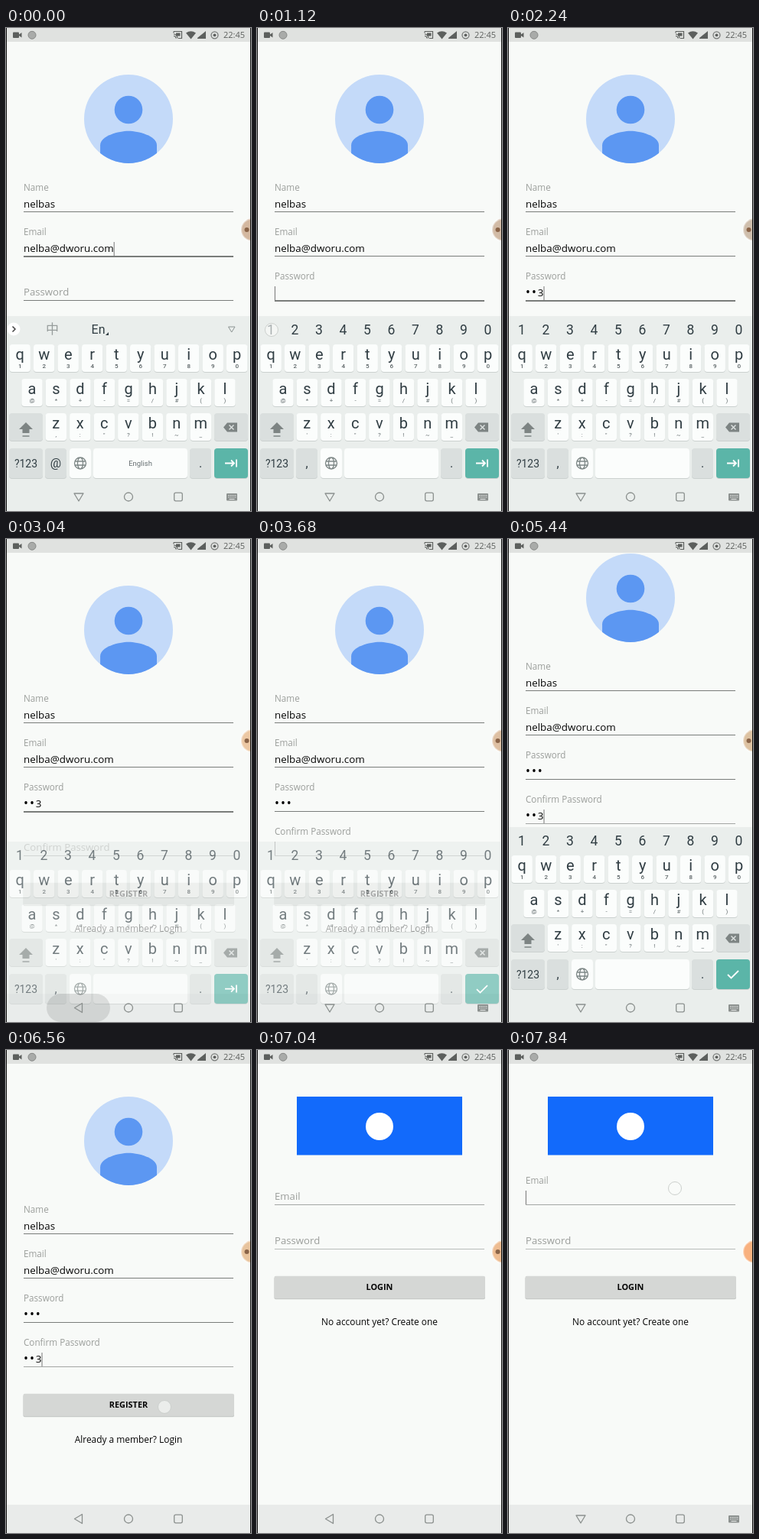
Write an HTML page that moves like this. It is 320x632 px and loops after 8 s.

```html
<!DOCTYPE html>
<html lang="en">
<head>
<meta charset="utf-8">
<title>Sign-up form</title>
<style>
  html, body { margin: 0; width: 100%; height: 100%; overflow: hidden; background: #f8faf8; }
  svg { display: block; width: 100%; height: 100%; }
  text { font-family: "Open Sans", "Noto Sans", sans-serif; fill: #050505; white-space: pre; }
  .hint { fill: #9b9e9b; }
  .key { font-family: Roboto, sans-serif; fill: #303d43; }
  .small { font-family: Roboto, sans-serif; fill: #666f71; }
  .digit { font-family: Roboto, sans-serif; fill: #5a6365; font-weight: 500; }
  .line { fill: none; stroke: #8b908e; stroke-width: 1.3; }
</style>
</head>
<body>
<svg id="stage" viewBox="0 0 320 632">
  <defs><clipPath id="disc"><circle cx="160" cy="119" r="58"/></clipPath></defs>
  <rect width="320" height="632" fill="#f8faf8"/>

  <g id="signup">
    <circle cx="160" cy="119" r="58" fill="#c4daf9"/>
    <g fill="#5c97f2" clip-path="url(#disc)">
      <circle cx="160" cy="107" r="18.300"/>
      <path transform="translate(104.600 70) scale(4.620)" d="M12 14C9.330 14 4 15.340 4 18V26H20V18C20 15.340 14.670 14 12 14Z"/>
    </g>
  </g>
  <g id="login">
    <rect y="18" width="320" height="580" fill="#f8faf8"/>
    <rect x="52" y="61" width="216" height="76.500" fill="#126afb"/>
    <circle cx="160" cy="100" r="18" fill="#fff"/>
  </g>
  <rect id="scrollbar" x="316" y="49" width="3" height="260" fill="#a5a8a6"/>

  <rect y="595" width="320" height="37" fill="#e9ebea"/>
  <g id="keyboard"><rect y="377" width="320" height="255" fill="#eaeeec"/></g>

  <rect id="backRipple" x="53" y="595" width="83" height="37" rx="18.500" fill="#000" opacity=".1"/>
  <g class="line" stroke-linejoin="round">
    <path id="back" d="M89 609H101L95 619Z"/>
    <circle cx="160" cy="613.500" r="5.500"/>
    <rect x="219.700" y="608.200" width="10.600" height="10.600" rx="2"/>
  </g>
  <g id="imeIcon">
    <rect x="288" y="609" width="14" height="9.500" rx="1" fill="#8b908e"/>
    <path d="M290 611.500H300.500M290 613.800H300.500" stroke="#e9ebea" stroke-dasharray="1.400 .9"/>
    <path d="M291.500 616.500H298.500" stroke="#e9ebea"/>
  </g>

  <rect width="320" height="18" fill="#e0e2e0"/>
  <g fill="#5c5f5d">
    <rect x="9" y="5.500" width="8" height="7.500" rx="1"/><path d="M17 8.500L20.500 6V12.500L17 10Z"/>
    <circle cx="34" cy="9.300" r="5" fill="#a9aba9" stroke="#858785"/>
    <path d="M219 4.500H229.500V13.500H225M219 4.500V6.500M219 8A5.500 5.500 0 0 1 224 13.500M219 10.500A3 3 0 0 1 222 13.500" fill="none" stroke="#5c5f5d" stroke-width="1.200"/>
    <rect x="222" y="6.500" width="5.500" height="4"/>
    <path d="M235 6.500Q241.500 2 248 6.500L241.500 14.500Z"/><path d="M250 14V13L261 4V14Z"/>
    <circle cx="272.500" cy="9.300" r="4.500" fill="none" stroke="#777a78" stroke-width="1.300"/><circle cx="272.500" cy="9.300" r="1.900"/>
  </g>
  <text x="284" y="13.300" font-size="11" style="fill:#5c5f5d">22:45</text>

  <circle id="bubble" cx="322" cy="264" r="15" stroke="#fff" stroke-opacity=".45" stroke-width="2.500"/>
  <circle id="bubbleDot" cx="314.500" cy="264" r="3" fill="#8a6448"/>
  <circle id="touch" r="8.500" fill="#fafcfa" fill-opacity=".6" stroke="#ccd0cd"/>
  <path d="M.5 0V632M319.500 0V632" stroke="#111"/>
</svg>

<script>
const LOOP = 8000, STEP = 160, REVEAL = 1500;
const $ = id => document.getElementById(id);
const show = (node, on) => node.setAttribute('display', on ? 'inline' : 'none');

function add(parent, tag, attrs, content) {
  const node = document.createElementNS('http://www.w3.org/2000/svg', tag);
  for (const name in attrs) node.setAttribute(name, attrs[name]);
  if (content) node.textContent = content;
  return parent.appendChild(node);
}
const label = (parent, x, y, size, content, attrs) =>
  add(parent, 'text', { x, y, 'font-size': size, ...attrs }, content);
const centred = (parent, x, y, size, content, cls = '') =>
  label(parent, x, y, size, content, { class: cls, 'text-anchor': 'middle' });

// Piecewise linear value through [time, value] stops.
function track(stops, t) {
  const next = stops.findIndex(s => s[0] > t);
  if (next === 0) return stops[0][1];
  if (next < 0) return stops[stops.length - 1][1];
  const [t0, a] = stops[next - 1], [t1, b] = stops[next];
  return a + (b - a) * (t - t0) / (t1 - t0);
}

/* ---- form ---- */
function field(parent, name, lineY, { value = '', focus = -1e4, blur = Infinity, typed = [], stroke = '#797c7a', focusWeight = 2 }) {
  const line = add(parent, 'rect', { x: 23, y: lineY, width: 274, fill: stroke });
  const hint = label(parent, 23, 0, 12, name, { class: 'hint' });
  const text = label(parent, 23, lineY - 5.5, 13.4, value);
  const dots = add(text, 'tspan', { 'font-size': 16, 'letter-spacing': 1.9 });
  const digit = add(text, 'tspan', {});
  const caret = add(parent, 'rect', { y: lineY - 18, width: 1, height: 18, fill: '#777' });

  return t => {
    const up = value ? 1 : Math.min(1, Math.max(0, (t - focus + 80) / 200));
    hint.setAttribute('y', lineY - 6.5 - 21 * up);
    hint.setAttribute('font-size', 13.2 - 1.5 * up);

    const done = typed.filter(at => at <= t), last = done[done.length - 1];
    const shown = done.length && t - last < REVEAL;
    dots.textContent = '•'.repeat(done.length - (shown ? 1 : 0));
    digit.textContent = shown ? done.length : '';

    const focused = focus <= t && t < blur;
    line.setAttribute('height', focused ? focusWeight : 1);
    const since = t - (last ?? Math.max(focus, 0));
    const on = focused && since % 1000 < 500;
    show(caret, on);
    if (on) caret.setAttribute('x', 23 + (text.textContent ? text.getComputedTextLength() : 0));
  };
}

function button(parent, y, caption) {
  add(parent, 'rect', { x: 22.5, y: y + 1, width: 275.5, height: 29.3, rx: 2, fill: '#c6c9c7' });
  add(parent, 'rect', { x: 22.5, y: y - .3, width: 275.5, height: 29.3, rx: 2, fill: '#d5d7d5' });
  label(parent, 160, y + 18, 10.9, caption, { 'text-anchor': 'middle', 'font-weight': 700 });
}

const signup = $('signup'), login = $('login');
const light = { stroke: '#a3a6a4', focusWeight: 1 };
const fields = [
  field(signup, 'Name', 240, { value: 'nelbas', focus: Infinity }),
  field(signup, 'Email', 298, { value: 'nelba@dworu.com', blur: 640 }),
  field(signup, 'Password', 356, { focus: 640, blur: 3520, typed: [1280, 1680, 2080] }),
  field(signup, 'Confirm Password', 414, { focus: 3520, typed: [4480, 4880, 5280], ...light }),
  field(login, 'Email', 202, { focus: 7680, ...light }),
  field(login, 'Password', 260, { focus: Infinity, stroke: '#b9bcba' }),
];
button(signup, 450, 'REGISTER');
centred(signup, 160, 514, 11.9, 'Already a member? Login');
button(login, 296, 'LOGIN');
centred(login, 160, 359.5, 11.9, 'No account yet? Create one');

/* ---- keyboard ---- */
const keyboard = $('keyboard');
const WHITE = '#fbfdfc', GREY = '#dadfde', TEAL = '#5bb5a8', PITCH = 31.5;

function cap(x, y, width, fill, height = 36) {
  add(keyboard, 'rect', { x, y: y + 1, width, height, rx: 4, fill: '#cbd1cf' });
  add(keyboard, 'rect', { x, y, width, height, rx: 4, fill });
}
function keyRow(letters, hints, x, y, hintClass = 'small') {
  [...letters].forEach((letter, i) => {
    const cx = x + i * PITCH;
    cap(cx - 13.7, y, 27.4, WHITE);
    centred(keyboard, cx, y + 20, 20, letter, 'key');
    centred(keyboard, cx, y + 31, 8, hints[i], hintClass);
  });
}
const icon = (parent, d, stroke, attrs) =>
  add(parent, 'path', { d, stroke, fill: 'none', 'stroke-width': 1.5, ...attrs });

keyRow('qwertyuiop', '1234567890', 18.2, 414, 'digit');
keyRow('asdfghjkl', '@*+-=/#()', 34, 459);
keyRow('zxcvbnm', ' :"?!~_', 65.3, 504);
cap(4, 504, 44, GREY);
cap(272, 504, 44, GREY);
cap(4, 550, 44, GREY, 39);
cap(51, 550, 28, GREY, 39);
cap(83, 550, 28, WHITE, 39);
cap(114, 550, 123, WHITE, 39);
cap(240, 550, 28, GREY, 39);
cap(272, 550, 44, TEAL, 39);

icon(keyboard, 'M26 516L35 525H30.500V530H21.500V525H17Z', 'none', { fill: '#7d8483' });
icon(keyboard, 'M21.500 534H30.500', '#7d8483');
icon(keyboard, 'M284 522.500L289 516.500H302V528.500H289Z', 'none', { fill: '#7d8483' });
icon(keyboard, 'M291.500 519.500L297.500 525.500M297.500 519.500L291.500 525.500', GREY);
icon(keyboard, 'M89.500 569.500a7.500 7.500 0 1 0 15 0a7.500 7.500 0 1 0 -15 0M93.500 569.500a3.500 7.500 0 1 0 7 0a3.500 7.500 0 1 0 -7 0M90 567H104M90 572H104', '#7d8786', { 'stroke-width': 1.3 });
centred(keyboard, 26, 575, 14, '?123', 'key');
centred(keyboard, 254, 575, 16, '.', 'key');

const emailKeys = add(keyboard, 'g', {}), numberKeys = add(keyboard, 'g', {});
add(emailKeys, 'circle', { cx: 10, cy: 394, r: 8.5, fill: '#fff' });
icon(emailKeys, 'M8.500 390.500L12 394L8.500 397.500', '#444');
label(emailKeys, 60.5, 400, 17, '中', { 'text-anchor': 'middle', style: 'font-family:"Noto Sans CJK SC","Noto Sans CJK",sans-serif;fill:#969c9b' });
centred(emailKeys, 120.5, 400, 16, 'En', 'key');
icon(emailKeys, 'M134 398V402H130Z', 'none', { fill: '#303d43' });
icon(emailKeys, 'M290.500 391H299L294.700 398Z', '#8b9392', { 'stroke-width': 1 });
centred(emailKeys, 65, 574.5, 16, '@', 'key');
centred(emailKeys, 175.5, 573, 9.5, 'English', 'small');
centred(emailKeys, 65.3, 535, 8, ',', 'small');
[...'1234567890'].forEach((n, i) => centred(numberKeys, 18 + i * PITCH, 401, 17.5, n, 'key'));
centred(numberKeys, 65, 575, 16, ',', 'key');
centred(numberKeys, 65.3, 535, 8, "'", 'small');

const nextIcon = icon(keyboard, 'M286 569.500H298M294 565.500L298 569.500L294 573.500M301 564.500V574.500', '#fff', { 'stroke-width': 1.8 });
const doneIcon = icon(keyboard, 'M287 570L291.500 574.500L301 565', '#fff', { 'stroke-width': 1.8 });

/* ---- timeline ---- */
const keyboardUp = [[2880, 1], [3040, .66], [3200, 0], [3520, 0], [3680, .66], [3840, 1], [5920, 1], [6080, .66], [6240, 0]];
const scroll = [[3680, 0], [4000, -42], [5920, -42], [6080, 0]];
const bubbleTone = [[0, '#d4b8a0'], [2240, '#cfbeac'], [3040, '#ecc8a4'], [4320, '#cfb8a2'],
                    [5440, '#ddc2a2'], [6560, '#e8c49e'], [7840, '#f8b17f']];
const channel = n => bubbleTone.map(([at, hex]) => [at, parseInt(hex.slice(1 + 2 * n, 3 + 2 * n), 16)]);
const bubbleRgb = [0, 1, 2].map(channel);
// start, end, x, y
const touches = [
  [320, 640, 294, 570],
  [1120, 1440, 19, 395], [1600, 1840, 50, 395], [1920, 2240, 82, 395],
  [2720, 3040, 95, 613], [3360, 3680, 150, 403],
  [4320, 4640, 19, 395], [4800, 4960, 50, 395], [5120, 5440, 82, 395],
  [5760, 6080, 95, 613], [6400, 6880, 207, 467], [7680, 8000, 218, 181],
];

function render(t) {
  fields.forEach(update => update(t));
  signup.setAttribute('transform', `translate(0 ${track(scroll, t)})`);
  $('scrollbar').setAttribute('opacity', track([[3840, 0], [4000, 1], [4480, 1], [4800, 0]], t));

  const enter = track([[6720, 0], [7040, 1]], t);
  show(login, enter > 0);
  login.setAttribute('opacity', enter);
  login.setAttribute('transform', `translate(0 ${40 * (1 - enter)})`);

  const up = track(keyboardUp, t);
  show(keyboard, up > 0);
  keyboard.setAttribute('opacity', up);
  keyboard.setAttribute('transform', `translate(0 ${56 * (1 - up)})`);
  show(emailKeys, t < 800);
  show(numberKeys, t >= 800);
  show(nextIcon, t < 3520);
  show(doneIcon, t >= 3520);

  const imeOpen = t < 2880 || (t >= 3680 && t < 5920) || t >= 7840;
  show($('imeIcon'), imeOpen);
  $('back').setAttribute('transform', imeOpen ? '' : 'rotate(90 95 613.5)');
  show($('backRipple'), (t >= 2880 && t < 3200) || (t >= 5920 && t < 6240));

  $('bubble').setAttribute('fill', `rgb(${bubbleRgb.map(stops => Math.round(track(stops, t)))})`);
  show($('bubbleDot'), t < 7680);

  const tap = touches.find(([start, end]) => start <= t && t < end);
  show($('touch'), tap);
  if (tap) {
    $('touch').setAttribute('cx', tap[2]);
    $('touch').setAttribute('cy', tap[3]);
  }
}

const start = performance.now();
function tick() {
  const t = (performance.now() - start) % LOOP;
  render(Math.floor(t / STEP) * STEP);
  requestAnimationFrame(tick);
}
tick();
</script>
</body>
</html>
```
